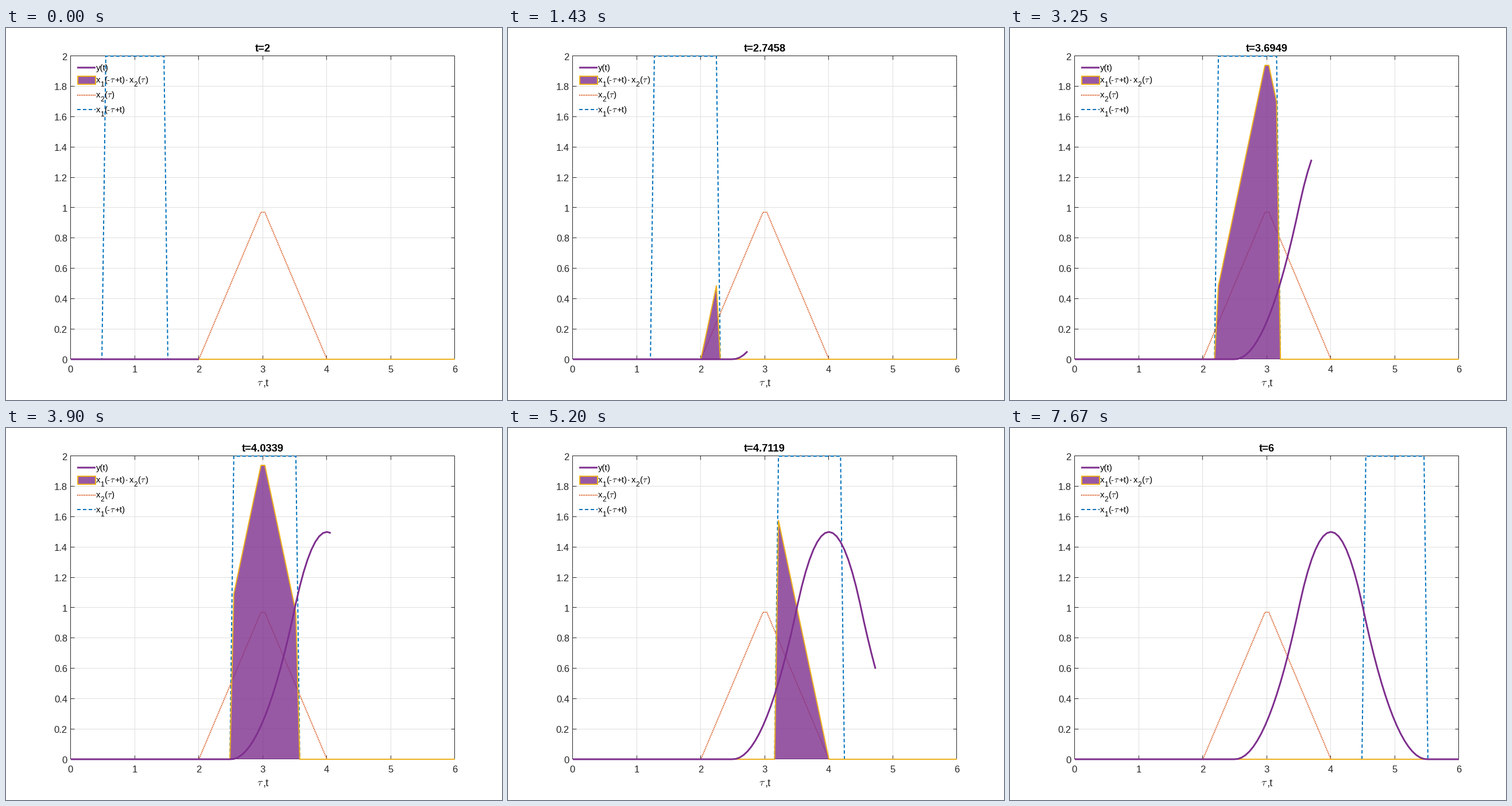
A matplotlib script for the animation above (7800 ms loop, 864 by 648 pixels).

```python
import numpy as np
import matplotlib.pyplot as plt
from matplotlib.animation import FuncAnimation
from matplotlib.patches import Rectangle

plt.rcParams["font.family"] = "Liberation Sans"
plt.rcParams["mathtext.fontset"] = "cm"

W, H, DPI = 864, 648, 120
FRAMES, INTERVAL = 60, 130
PX = 72 / DPI  # points per pixel
LEFT, RIGHT, TOP, BOTTOM = 113, 782, 49, 577
BLUE, RED, YELLOW, PURPLE = "#0072BD", "#D95319", "#EDB120", "#7E2F8E"
INK, GRID = "#262626", "#DFDFDF"
TAU = r"$\tau$"


def px(tau):
    return LEFT + np.asarray(tau) * (RIGHT - LEFT) / 6


def py(value):
    return BOTTOM - np.asarray(value) * (BOTTOM - TOP) / 2


fig = plt.figure(figsize=(W / DPI, H / DPI), dpi=DPI, facecolor="white")
ax = fig.add_axes([0, 0, 1, 1])
ax.set_xlim(0, W)
ax.set_ylim(H, 0)
ax.axis("off")


def line(xs, ys, color, width, z, **style):
    return ax.plot(xs, ys, color=color, lw=width * PX, zorder=z, snap=False,
                   dash_capstyle="butt", solid_capstyle="butt",
                   solid_joinstyle="round", **style)[0]


def hairline(xs, ys, color, z):
    """One-pixel line centred on whole pixels."""
    line(np.ceil(xs) - 0.5, np.ceil(ys) - 0.5, color, 1, z)


def dashes(on, off, width):
    return {"linestyle": (0, (on / width, off / width))}


def label(x, y, s, size, color=INK, ha="left", va="baseline", **kw):
    return ax.text(x, y, s, fontsize=size, color=color, ha=ha, va=va,
                   zorder=10, **kw)


# Axes box, grid, inward ticks and tick labels
TICK = 0.01 * (RIGHT - LEFT)
for v in range(7):
    x = px(v)
    if 0 < v < 6:
        hairline([x, x], [TOP, BOTTOM], GRID, 1)
    hairline([x, x], [BOTTOM, BOTTOM - TICK], INK, 2)
    hairline([x, x], [TOP, TOP + TICK], INK, 2)
    label(x - 0.5, 600, str(v), 10, ha="center")
for k in range(11):
    y = py(k / 5)
    if 0 < k < 10:
        hairline([LEFT, RIGHT], [y, y], GRID, 1)
    hairline([LEFT, LEFT + TICK], [y, y], INK, 2)
    hairline([RIGHT, RIGHT - TICK], [y, y], INK, 2)
    label(107, y + 6.5, f"{k / 5:g}", 10, ha="right")
hairline([LEFT, RIGHT, RIGHT, LEFT, LEFT], [BOTTOM, BOTTOM, TOP, TOP, BOTTOM],
         INK, 2)
label(437, 623, TAU, 11)
label(447, 623, ",t", 11)
title = label(447, 41, "", 11, "black", ha="center", weight="bold")

# Legend
DASH, DOT = dashes(6, 4, 2), dashes(1.6, 1.4, 2)
KEY = [124, 156]
line(KEY, [69, 69], PURPLE, 3, 9)
ax.add_patch(Rectangle((125, 84), 31, 14, fc=PURPLE, alpha=0.8, lw=0, zorder=9))
ax.add_patch(Rectangle((125, 84), 31, 14, fc="none", ec=YELLOW,
                       lw=2 * PX, zorder=9.1))
line(KEY, [117, 117], RED, 2, 9, **DOT)
line(KEY, [142, 142], BLUE, 2, 9, **DASH)


def legend_text(x, y, s, size=9):
    label(x, y, s, size, "black")


def x1_text(x, y):
    legend_text(x, y, "x")
    legend_text(x + 7.5, y + 6.5, "1", 7.2)
    legend_text(x + 14.2, y, "(-")
    legend_text(x + 24.2, y, TAU)
    legend_text(x + 32.2, y, "+t)")


def x2_text(x, y):
    legend_text(x, y, "x")
    legend_text(x + 7.5, y + 6.5, "2", 7.2)
    legend_text(x + 14.2, y, "(")
    legend_text(x + 19.2, y, TAU)
    legend_text(x + 27.2, y, ")")


legend_text(157, 74, "y(t)")
x1_text(157, 95)
legend_text(207, 95, "·")
x2_text(215.3, 95)
x2_text(157, 121)
x1_text(157, 147)

# Signals
tau = np.linspace(0, 6, 100)
times = np.linspace(2, 6, FRAMES)
triangle = np.clip(1 - np.abs(tau - 3), 0, None)
u = np.abs(tau - 4)
response = np.where(u < 0.5, 1.5 - 2 * u**2, np.clip(1.5 - u, 0, None) ** 2)

pulse_line = line([], [], BLUE, 2, 3, **DASH)
line(px(tau), py(triangle), RED, 2, 4, **DOT)
area = ax.fill([0], [0], fc=PURPLE, alpha=0.8, lw=0, zorder=5)[0]
area_edge = line([], [], YELLOW, 2, 6)
response_line = line([], [], PURPLE, 3, 7)


def update(i):
    t = times[i]
    pulse = np.where(np.abs(t - tau - 1) <= 0.5, 2.0, 0.0)
    product = pulse * triangle
    pulse_line.set_data(px(tau), py(pulse))
    area.set_xy(np.column_stack([px(tau), py(product)]))
    area_edge.set_data(px(tau), py(product))
    end = int(np.argmin(np.abs(tau - t))) + 1
    response_line.set_data(px(tau[:end]), py(response[:end]))
    title.set_text(f"t={t:.5g}")
    return pulse_line, area, area_edge, response_line, title


anim = FuncAnimation(fig, update, frames=FRAMES, interval=INTERVAL,
                     init_func=lambda: update(0), repeat=True, repeat_delay=0)
plt.show()
```
